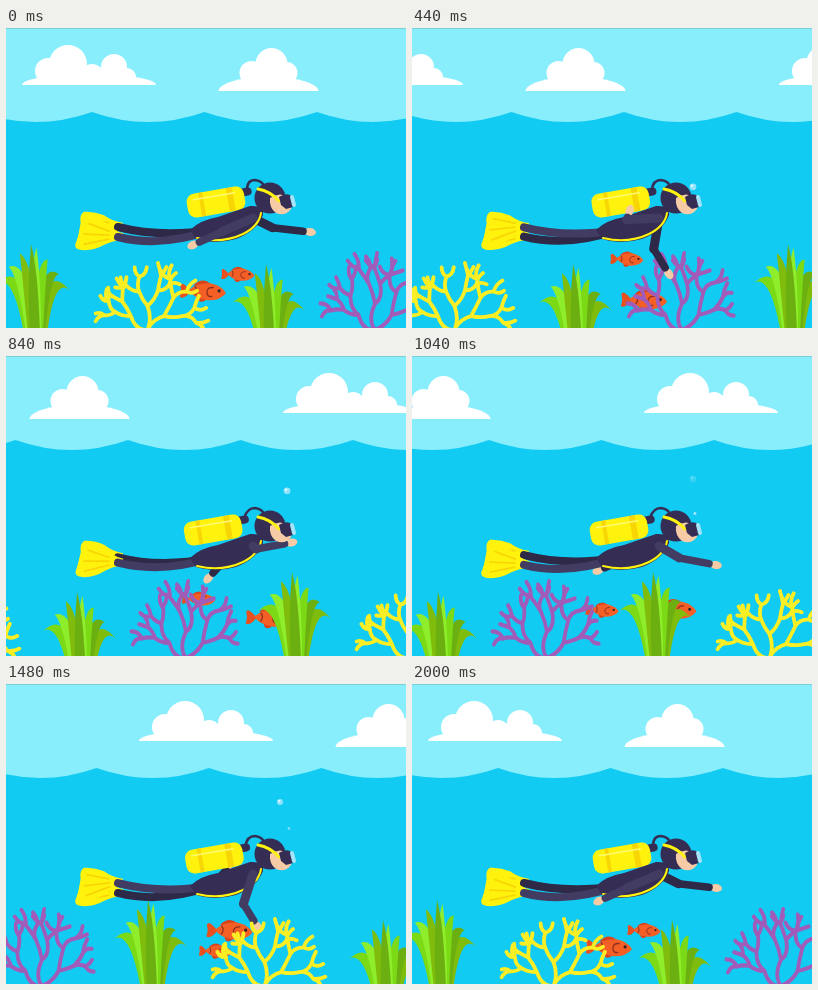
Recreate the animation shown at these times as an HTML page with a canvas. Size 400 px wide and 300 px high, loop 2.04 s.

```html
<!DOCTYPE html>
<html lang="en">
<head>
<meta charset="utf-8">
<title>Diver</title>
<style>
html, body { margin: 0; width: 100%; height: 100%; overflow: hidden; background: #12cbf2; }
canvas { display: block; width: 400px; height: 300px; }
</style>
</head>
<body>
<canvas id="stage" width="400" height="300"></canvas>
<script>
const c = document.getElementById('stage').getContext('2d');
const LOOP = 2040, CYCLE = 2000, STEP = 40, SPAN = 450, TAU = Math.PI * 2;
const SUIT = '#352d54', LIMB = '#433c62', SUIT_FAR = '#2e2947';
const SKIN = '#f6cba6', YELLOW = '#fff30d', GOLD = '#f8d606';

function fill(d, color) {
  c.fillStyle = color;
  c.fill(new Path2D(d));
}
function line(d, color, width) {
  c.strokeStyle = color;
  c.lineWidth = width;
  c.lineCap = c.lineJoin = 'round';
  c.stroke(new Path2D(d));
}
function oval(x, y, rx, ry, color, turn = 0) {
  c.fillStyle = color;
  c.beginPath();
  c.ellipse(x, y, rx, ry, turn, 0, TAU);
  c.fill();
}
function place(x, y, draw, turn = 0, sx = 1, sy = sx) {
  c.save();
  c.translate(x, y);
  c.rotate(turn);
  c.scale(sx, sy);
  draw();
  c.restore();
}
// Scenery repeats every SPAN pixels as it scrolls to the left.
function scroll(x, y, shift, draw, sx, sy) {
  for (const at of [x - shift, x - shift + SPAN]) place(at, y, draw, 0, sx, sy);
}
// Sine wave over one cycle, peaking at the given time.
const wave = (t, peak) => Math.cos(TAU * (t - peak) / CYCLE);

function cloud(width, height, puffs) {
  return () => {
    c.beginPath();
    c.rect(-80, -60, 160, 60);
    c.clip();
    oval(0, 0, width, height, '#fff');
    puffs.forEach(([x, y, r]) => oval(x, y, r, r, '#fff'));
  };
}
const wideCloud = cloud(67, 11, [[-21, -21, 19], [-41, -14, 13], [3, -9, 12], [25, -18, 13], [38, -8, 9]]);
const smallCloud = cloud(50, 14, [[3, -27, 16], [-17, -18, 12], [18, -18, 11]]);

function sea(shift) {
  const gap = SPAN / 4;
  let x = 86 - shift % gap - gap, d = `M${x} 84`;
  for (let i = 0; i < 6; i++, x += gap) d += `Q${x + gap / 2} 104 ${x + gap} 84`;
  fill(d + 'V300H-150Z', '#12cbf2');
}

// Blades lean alternately left and right, from the drooping outer ones to the tall middle.
function grass() {
  const colors = ['#7fbc0c', '#7bd916', '#6bb010', '#8fee2c'], count = 8;
  for (let i = 0; i < count; i++) {
    const side = i % 2 ? -1 : 1, lean = 1 - i / (count - 1);
    const x = side * 39 * lean, y = 47 * lean ** 1.3, base = 4 + side * 7 * lean;
    const cx = x * .4 + 2, cy = y + 30 - 58 * lean;
    fill(`M${base - side * 5} 90Q${cx - side * 5} ${cy - 5} ${x} ${y}` +
      `Q${cx + side * 6} ${cy + 12} ${base + side * 5} 90Z`, colors[i % 4 ^ i >> 2]);
  }
}

function random(seed) {
  return () => (seed = seed * 16807 % 2147483647) / 2147483647;
}
// A fan of curved twigs; each one forks in two, angles measured from straight up.
function coral(color, seed) {
  const rand = random(seed);
  let d = '';
  function grow(x, y, angle, length, forks) {
    const bend = angle + (rand() - .5) * 1.4;
    const mx = x + Math.sin(bend) * length * .5, my = y - Math.cos(bend) * length * .5;
    const ex = x + Math.sin(angle) * length * .85, ey = y - Math.cos(angle) * length;
    d += `M${x} ${y}Q${mx} ${my} ${ex} ${ey}`;
    if (!forks) return;
    for (const side of [-1, 1]) {
      grow(ex, ey, angle + side * (.3 + rand() * .45), length * (.7 + rand() * .2), forks - 1);
    }
  }
  for (const angle of [-.95, 0, .95]) grow(0, 2, angle, 24, 3);
  return () => line(d, color, 3.8);
}
const purpleCoral = coral('#a05cb8', 77), yellowCoral = coral('#fbee24', 2024);

function fish() {
  fill('M-13 0Q-22 -10 -23 -4Q-21 1 -23 7Q-19 10 -13 2Z', '#e8501f');
  fill('M-10 -5Q-2 -14 7 -8L10 -4ZM-5 6Q-4 13 2 10L6 6Z', '#d9431b');
  fill('M-15 0Q-5 -9 8 -8Q19 -6 23 1Q17 9 5 9Q-8 8 -15 0Z', '#f45f26');
  line('M10 -4Q3 -4 4 2Q5 6 9 5M-8 -4Q-5 0 -8 4', '#8f2e20', 1.3);
  oval(16, -1, 1.6, 1.6, '#3a2027');
}
function shoal(t) {
  place(211 + 21 * wave(t, 0), 249 - 18 * wave(t, 450), fish, .05, .72);
  place(230 + 34 * wave(t, 920), 259 + 13 * wave(t, 400), fish, .05);
}

// Evenly timed key places of a swimming hand, joined by a closed smooth curve.
const STROKE = [[187, 217], [204, 190], [254, 175], [304, 204], [270, 248], [227, 227]];
function hand(t) {
  const n = STROKE.length, pos = t / CYCLE * n, i = Math.floor(pos), u = pos - i;
  const [p, a, b, q] = [-1, 0, 1, 2].map(k => STROKE[(i + k + n) % n]);
  return [0, 1].map(k => a[k] + u / 2 * (b[k] - p[k] +
    u * (2 * p[k] - 5 * a[k] + 4 * b[k] - q[k] + u * (3 * (a[k] - b[k]) + q[k] - p[k]))));
}
// The elbow falls back behind the shoulder as the hand comes closer.
function arm(t, color) {
  const [sx, sy] = [247, 190], [hx, hy] = hand(t % CYCLE);
  const reach = Math.hypot(hx - sx, hy - sy);
  const slack = .6 * Math.sqrt(Math.max(0, 33 ** 2 - reach ** 2 / 4));
  const ex = (sx + hx) / 2 - slack, ey = (sy + hy) / 2 + slack * .3;
  const turn = Math.atan2(hy - ey, hx - ex);
  oval(hx, hy, 6, 4, SKIN, turn);
  line(`M${sx} ${sy}L${ex} ${ey}`, color, 9);
  line(`M${ex} ${ey}L${hx - 7 * Math.cos(turn)} ${hy - 7 * Math.sin(turn)}`, color, 7.5);
}

function leg(swing, color) {
  const y = 204 + 5 * swing;
  place(113, y - 1, () => {
    fill('M4 -3Q-6 -5 -14 -12Q-24 -17 -34 -17Q-39 -14 -38 -6L-43 12Q-43 17 -36 17Q-24 17 -14 10Q-6 5 4 4Z', YELLOW);
    line('M-10 -4L-31 -10M-10 0L-35 1M-10 4L-34 11', GOLD, 1.8);
  }, swing * .08);
  line(`M112 ${y}Q155 ${y + 11} 205 202`, color, 8);
}

function tank() {
  line('M28 -5L33 -5', SUIT, 8);
  c.beginPath();
  c.roundRect(-29, -12, 58, 24, 8);
  c.fillStyle = YELLOW;
  c.fill();
  c.fillStyle = GOLD;
  c.fillRect(-16, -12, 4, 24);
  c.fillRect(12, -12, 6, 24);
  line('M-22 -6H20', '#fffa70', 1.5);
}

function head() {
  oval(264, 170, 15.5, 15.5, SUIT);
  fill('M264 170Q274 163 284 170L285 181Q279 189 270 185Q263 180 264 170Z', SKIN);
  line('M252 161Q264 163 273 173', YELLOW, 3);
  fill('M273 169Q280 164 286 168L287 179L280 181L275 177Z', SUIT);
  line('M286 169L288 177', '#a5e4f8', 4);
}

function diver(t) {
  const kick = wave(2 * t, 0), drift = 1.5 * (wave(t, 0) - 1);
  arm(t + CYCLE / 2, SUIT_FAR);
  leg(-kick, SUIT_FAR);
  leg(kick, LIMB);
  place(210 + drift, 174, tank, -.17);
  fill('M184 202Q194 192 212 189L244 178Q258 177 257 187Q251 203 230 211Q208 217 190 211Z', SUIT);
  line('M191 210Q216 216 237 206Q253 198 255 185', YELLOW, 2);
  line(`M${241 + drift} 162Q241 152 249 152Q257 153 259 160`, SUIT, 2.5);
  arm(t, LIMB);
  head();
}

// Start time, x, radius, rising speed.
const BUBBLES = [[420, 281, 3.4, .06], [960, 283, 1.5, .03], [1060, 274, 3, .1], [1560, 274, 2.3, .06]];
function bubbles(t) {
  for (const [start, x, r, speed] of BUBBLES) {
    const age = (t - start) / 700, y = 160 - speed * (t - start);
    if (age < 0 || age > 1) continue;
    c.globalAlpha = Math.min(1, (1 - age) * 2.5);
    oval(x, y, r, r, '#8fe2fa');
    oval(x - r * .3, y - r * .3, r * .4, r * .4, '#dcf8ff');
  }
  c.globalAlpha = 1;
}

function scene(t) {
  const shift = SPAN * t / CYCLE;
  c.fillStyle = '#89eefc';
  c.fillRect(0, 0, 400, 300);
  c.fillStyle = '#79cfd2';
  c.fillRect(0, 0, 400, 1);
  scroll(83, 57, shift, wideCloud);
  scroll(262.5, 63, shift, smallCloud);
  sea(shift);
  shoal(t);
  scroll(369, 300, shift, purpleCoral, 1, 1.1);
  diver(t);
  bubbles(t);
  scroll(141.5, 300, shift, yellowCoral);
  scroll(25, 216, shift, grass);
  scroll(260, 236, shift, grass);
}

function frame() {
  const t = Math.floor(performance.now() % LOOP / STEP) * STEP;
  scene(t % CYCLE);
  requestAnimationFrame(frame);
}
frame();
</script>
</body>
</html>
```
